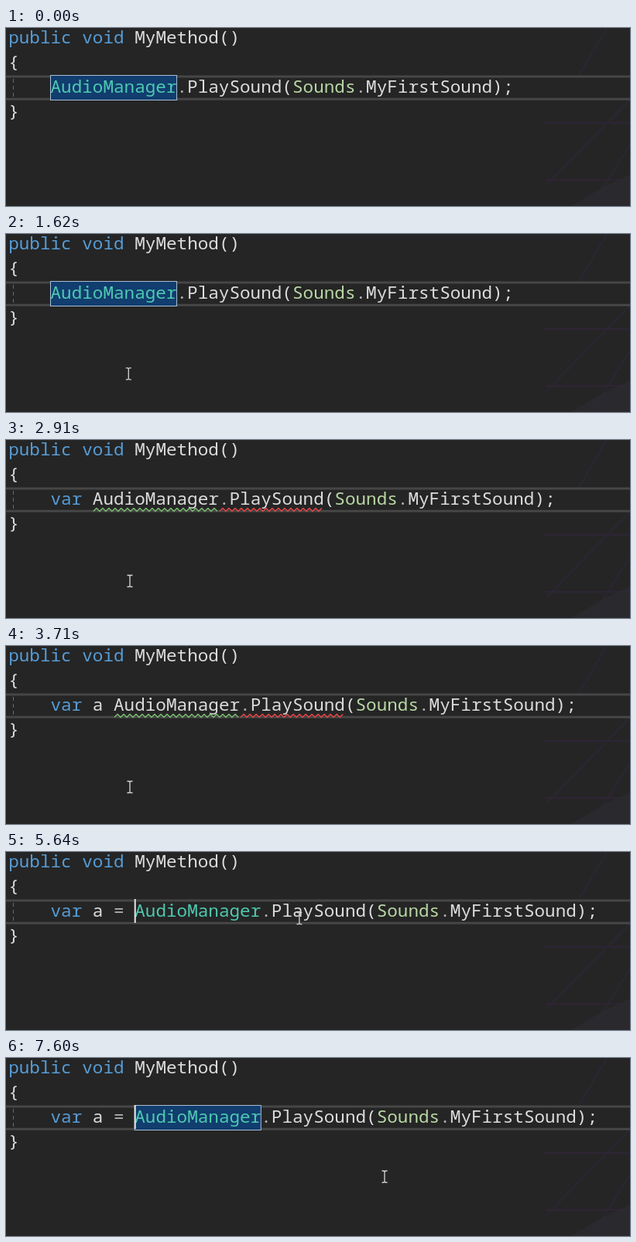
Recreate the animation shown at these times as an HTML page. Size 806x231 px, loop 8000 ms.

```html
<!DOCTYPE html>
<html lang="en">
<head>
<meta charset="utf-8">
<title>Editing a method call</title>
<style>
  html, body { margin: 0; width: 100%; height: 100%; overflow: hidden; background: #252525; }
  svg { display: block; width: 100vw; height: 100vh; }
  text { white-space: pre; fill: #dcdcdc; }
  .code { font: 22.65px "Noto Sans Mono", "DejaVu Sans Mono", monospace; }
  .tip text { font: 11.4px "Open Sans", "Noto Sans", sans-serif; fill: #f1f1f1; }
  .tip .title { font-size: 11.55px; }
  .tip rect { fill: #424245; stroke: #525256; }
  .key { fill: #569cd6; }
  .type { fill: #4ec9b0; }
  .enum { fill: #b8d7a3; }
  .op { fill: #b4b4b4; }
  .wave { fill: none; stroke-width: 1.6; stroke-linejoin: round; }
</style>
</head>
<body>
<svg viewBox="0 0 806 231">
  <rect width="806" height="231" fill="#252525"/>

  <!-- faint wallpaper -->
  <g fill="none" stroke="#30263a" stroke-width="2" opacity=".75">
    <path d="M696 123H806M696 197H806M698 204L806 93M740 62L776 0M756 231L806 152"/>
  </g>
  <path d="M730 231L770 207L806 190V231Z" fill="#2b2b32" opacity=".7"/>

  <!-- current line -->
  <path d="M0 63H806M0 92.3H806" stroke="#464646" stroke-width="3"/>
  <path d="M9.5 66V91" stroke="#6a6a6a" stroke-dasharray="5 4"/>

  <rect id="mark" y="61.5" height="32" fill="#113d6f" stroke="#a9bfd6"/>
  <g class="code">
    <text x="3.2" y="20"><tspan class="key">public void</tspan> MyMethod()</text>
    <text x="3.2" y="52">{</text>
    <text id="line" x="57.5" y="84"></text>
    <text x="3.2" y="116">}</text>
  </g>
  <path id="green" class="wave" stroke="#76b86c"/>
  <path id="red" class="wave" stroke="#e04545"/>
  <rect id="dots" y="62" height="31.5" fill="none" stroke="#f0f0f0" stroke-width="2" stroke-dasharray="2.4 3"/>
  <rect id="caret" y="61" width="2" height="31" fill="#e6e6e6"/>

  <g id="classTip" class="tip">
    <rect x="64.5" y="94.5" width="345" height="47"/>
    <path d="M83 107H89M86 107V112H89" fill="none" stroke="#c8c8c8" stroke-width="1.2"/>
    <path d="M78 107l4.5-4.5 3.5 3.5-4.5 4.5zM87 105.5l2.5-2.5 2.5 2.5-2.5 2.5zM87 112.500l2.500-2.500 2.500 2.500-2.500 2.500z" fill="#e0a35c"/>
    <text class="title" x="97" y="113"><tspan class="key">class</tspan> JSAM.<tspan class="type">AudioManager</tspan></text>
    <text x="77" y="133">AudioManager singleton that manages all audio in the game</text>
  </g>

  <g id="methodTip" class="tip">
    <rect x="389.5" y="94.500" width="430" height="47"/>
    <path d="M407.500 103.500l4 2v5l-4 2.500-4-2.500v-5zM403.500 105.500l4 2.200 4-2.200M407.500 107.700v5" fill="none" stroke="#b180d7" stroke-width="1.2"/>
    <text class="title" x="422" y="113"><tspan class="type">AudioSource AudioManager</tspan>.PlaySound&lt;<tspan class="enum">Sounds</tspan>&gt;(<tspan class="enum">Sounds</tspan> sound, [<tspan class="type">Transform</tspan></text>
    <text x="402" y="133">Plays the specified sound using the settings provided in the Audio File</text>
  </g>

  <circle id="click" r="12" fill="#d4c41c" opacity=".82"/>
  <path id="mouse" d="M-3.500-7.500h2.500l1 1 1-1h2.500M0-6.500V6.500M-3.500 7.500h2.500l1-1 1 1h2.500" fill="none" stroke="#d6d6d6" stroke-width="1.3"/>
</svg>

<script>
const LOOP = 8000, LEFT = 57.5, ADV = 13.59;
const $ = id => document.getElementById(id);

const typed = [
  [0, ''], [2020, 'v'], [2260, 'va'], [2410, 'var'], [2570, 'var '],
  [3460, 'var a'], [3560, 'var a '], [3870, 'var a ='], [3960, 'var a = ']
];
const caretOn = [
  [1080, 1610], [2140, 2660], [3190, 3710], [4240, 4760],
  [5300, 5820], [6430, 6950], [7470, LOOP]
];

const easeOut = u => 1 - (1 - u) ** 3;
const easeInOut = u => u < .5 ? 4 * u ** 3 : 1 - 4 * (1 - u) ** 3;
// start, end, from x, from y, to x, to y, easing
const moves = [
  [180, 1000, 649, 236, 63, 88, easeOut],
  [1000, 1030, 63, 88, 60, 87, easeOut],
  [1160, 1710, 60, 87, 160, 183, easeInOut],
  [5050, 5820, 160, 183, 390.5, 81, easeInOut],
  [7090, 7600, 390.5, 81, 489, 154, easeInOut]
];

const within = (t, a, b) => t >= a && t < b;
const col = n => LEFT + n * ADV;
const show = (el, on) => el.setAttribute('visibility', on ? 'visible' : 'hidden');
const span = (cls, s) => `<tspan class="${cls}">${s}</tspan>`;

function box(el, from, to, pad) {
  el.setAttribute('x', col(from) + pad);
  el.setAttribute('width', (to - from) * ADV - 2 * pad);
}

function wave(el, from, to) {
  let d = '', down = true;
  for (let x = col(from) + 1; x < col(to) - 1; x += 4, down = !down)
    d += `${d ? 'L' : 'M'}${x.toFixed(1)} ${down ? 92.5 : 88.5}`;
  el.setAttribute('d', d);
}

function mouseAt(t) {
  let pos = [649, 260];
  for (const [a, b, x0, y0, x1, y1, ease] of moves) {
    if (t < a) break;
    const k = ease(Math.min(1, (t - a) / (b - a)));
    pos = [x0 + (x1 - x0) * k, y0 + (y1 - y0) * k];
  }
  return pos;
}

function codeLine(t, prefix) {
  const isVar = t >= 2610;
  const head = isVar ? span('key', 'var') + prefix.slice(3).replace('=', span('op', '=')) : prefix;
  const cls = within(t, 2910, 4300) ? '' : 'type';
  return head + span(cls, 'AudioManager') + span('op', '.') + 'PlaySound(' +
    span('enum', 'Sounds') + span('op', '.') + 'MyFirstSound);';
}

let shown = '';
function render(t) {
  const prefix = typed.filter(([at]) => at <= t).pop()[1];
  const n = prefix.length, end = n + 12;

  const html = codeLine(t, prefix);
  if (html !== shown) $('line').innerHTML = shown = html;

  show($('mark'), t < 2020 || t >= 5910);
  box($('mark'), n, end, 0);

  const renaming = within(t, 3460, 3560);
  const first = renaming ? 4 : 0;
  show($('dots'), within(t, 2020, 2570) || renaming);
  box($('dots'), first, end, .5);

  show($('green'), within(t, 2660, 3960));
  wave($('green'), renaming ? first : n, end);
  show($('red'), within(t, 2660, 4800));
  wave($('red'), end, end + 10);

  show($('caret'), caretOn.some(([a, b]) => within(t, a, b)));
  $('caret').setAttribute('x', col(n) - .5);

  show($('classTip'), within(t, 940, 1290));
  show($('methodTip'), within(t, 5880, 7260));

  const [x, y] = mouseAt(t);
  $('mouse').setAttribute('transform', `translate(${x.toFixed(1)} ${y.toFixed(1)})`);
  show($('click'), within(t, 1030, 1160));
  $('click').setAttribute('cx', x - 1);
  $('click').setAttribute('cy', y - 1);
}

const start = performance.now();
function tick() {
  render((performance.now() - start) % LOOP);
  requestAnimationFrame(tick);
}
tick();
</script>
</body>
</html>
```
